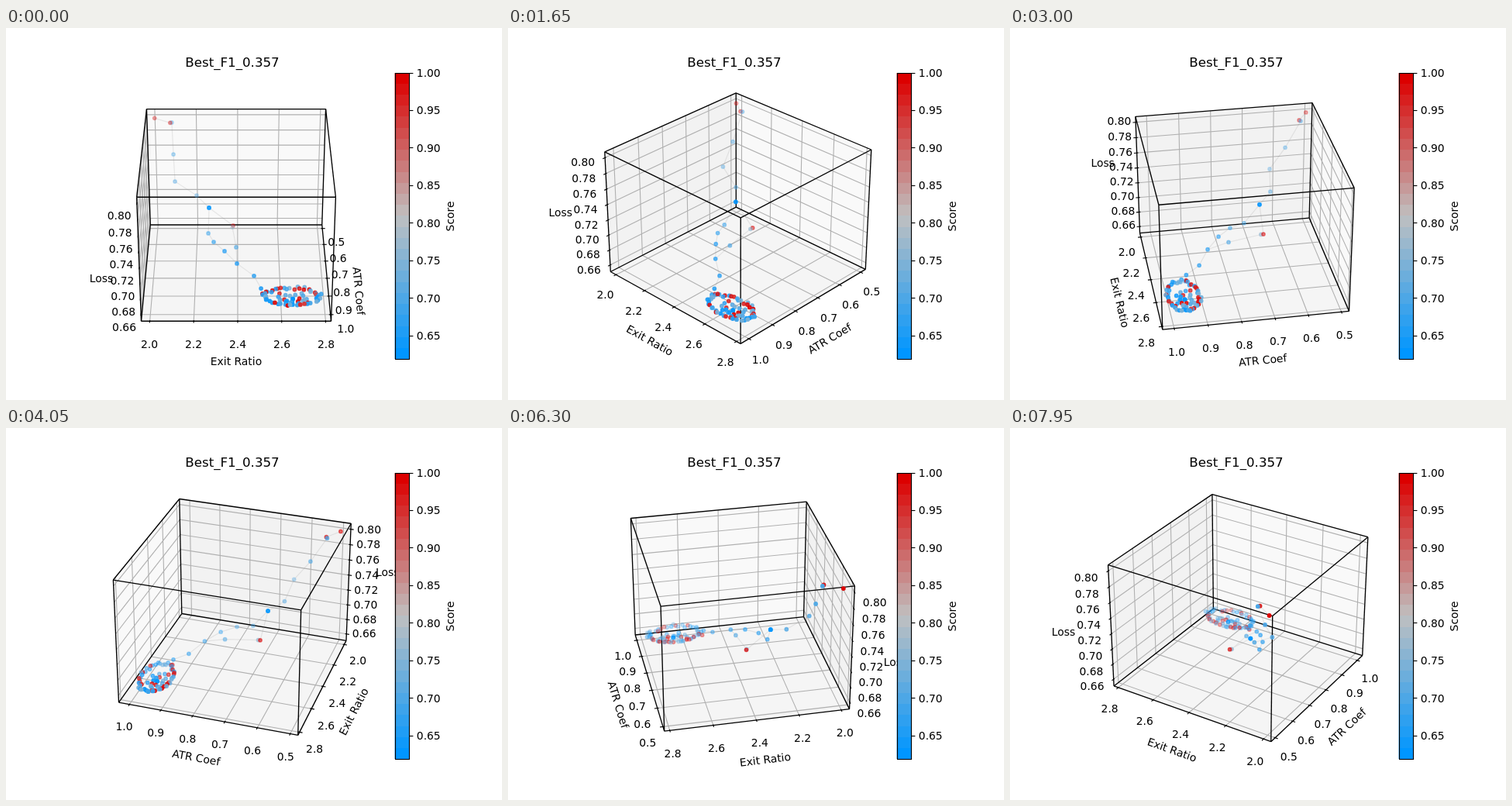
Write an HTML page with a canvas that moves like this. It is 640 px wide and 480 px high and loops after 8 s.

```html
<!DOCTYPE html>
<html>
<head>
<meta charset="utf-8">
<style>
html, body { margin: 0; width: 100%; height: 100%; overflow: hidden; background: #fff; }
canvas { display: block; }
</style>
</head>
<body>
<canvas id="stage" width="640" height="480"></canvas>
<script>
const ctx = document.getElementById('stage').getContext('2d');
const LOOP = 8000, STEP = 150, TURN = 4;
const HALF = [0.59524, 0.59524, 0.44643];   // half sizes of the box
const UNIT = [0.09524, 0.09524, 0.07143];   // a twelfth of each axis
const SCALE = 1997.8, CX = 297, CY = 237.4, DIST = 10;
const SIN = 0.5, COS = Math.sqrt(0.75);     // elevation of 30 degrees
const TICK_PAD = 1.037, LABEL_PAD = 2.255;

const axes = [
  { name: 'ATR Coef', from: 0.5, step: 0.1, n: 6, digits: 1, at: -0.5455, gap: 0.2135, other: 1, tickDir: 1 },
  { name: 'Exit Ratio', from: 2, step: 0.2, n: 5, digits: 1, at: -0.5415, gap: 0.2756, other: 0, tickDir: 0 },
  { name: 'Loss', from: 0.66, step: 0.02, n: 8, digits: 2, at: -0.3936, gap: 0.11403, tickDir: 0 }
];
const paneColors = ['#f9f9f9', '#f2f2f2', '#f5f5f5'];

// x, y, z, score
const trail = [
  [-0.541, -0.541, 0.406, 1], [-0.473, -0.435, 0.406, 0.97], [-0.481, -0.425, 0.404, 0.69],
  [-0.377, -0.414, 0.2215, 0.69], [-0.271, -0.403, 0.0756, 0.7], [-0.249, -0.261, -0.018, 0.7],
  [-0.161, -0.178, -0.061, 0.62], [-0.058, -0.1825, -0.195, 0.67], [0.042, -0.146, -0.201, 0.66],
  [0.131, -0.075, -0.2165, 0.65], [0.216, 0.005, -0.2575, 0.65], [0.289, 0.114, -0.305, 0.66],
  [0.381, 0.158, -0.341, 0.65], [0.385, 0.167, -0.378, 0.99]
];
const branch = [[-0.158, -0.02, -0.195, 0.99], [-0.143, -0.025, -0.199, 0.76], [0.077, 0, -0.22, 0.7]];
const links = [trail, [trail[6], ...branch, trail[10]]];

let seed = 11;
const rand = () => (seed = (seed * 16807) % 2147483647) / 2147483647;

// The late samples lie in a shallow elliptical bowl.
function bowl(count, inner, outer) {
  return Array.from({ length: count }, (_, i) => {
    const a = (i + rand() * 0.9) / count * 2 * Math.PI;
    const r = inner + (outer - inner) * rand();
    const score = rand() < 0.27 ? 0.93 + 0.07 * rand() : 0.63 + 0.11 * rand();
    return [0.425 + 0.112 * r * Math.cos(a), 0.355 + 0.185 * r * Math.sin(a),
      -0.4 + 0.035 * r * r + 0.008 * (rand() - 0.5), score];
  });
}
const best = [0.42, 0.36, -0.395, 0.62];
const points = [...trail, ...branch, trail[6], trail[6],
  ...bowl(50, 0.8, 1.02), ...bowl(20, 0.2, 0.75), best, best, best];

function scoreColor(score) {
  const k = (score - 0.6184) / 0.3816 * 2;
  const mix = (a, b, t) => a.map((v, i) => Math.round(v + (b[i] - v) * t));
  const mid = [192, 192, 192];
  const c = k < 1 ? mix([0, 150, 255], mid, Math.max(0, k)) : mix(mid, [220, 0, 0], k - 1);
  return `rgb(${c})`;
}

let ca = 1, sa = 0;
function project([x, y, z]) {
  const near = x * ca + y * sa;
  const depth = DIST - near * COS - z * SIN;
  const k = SCALE / depth;
  return [CX + k * (y * ca - x * sa), CY - k * (z * COS - near * SIN), depth];
}

function trace(pts, color, width) {
  ctx.beginPath();
  for (const p of pts) ctx.lineTo(...project(p).slice(0, 2));
  ctx.strokeStyle = color;
  ctx.lineWidth = width;
  ctx.stroke();
}

function text(str, x, y, size = 13.89, align = 'center', angle = 0, drop = 0) {
  ctx.save();
  ctx.translate(x, y);
  ctx.rotate(angle);
  ctx.font = size + 'px "DejaVu Sans", sans-serif';
  ctx.textAlign = align;
  ctx.fillStyle = '#000';
  ctx.fillText(str, 0, drop);
  ctx.restore();
}

const set = (p, i, v) => { const q = p.slice(); q[i] = v; return q; };
const outward = (p, axis, pad) =>
  p.map((v, i) => i === axis ? v : v + Math.sign(v) * pad * UNIT[i]);
const tickValues = a => Array.from({ length: a.n }, (_, i) => a.at + a.gap * i);

function drawBox(back) {
  paneColors.forEach((color, i) => {
    const j = (i + 1) % 3, k = (i + 2) % 3;
    ctx.beginPath();
    for (const [s, t] of [[-1, -1], [1, -1], [1, 1], [-1, 1]]) {
      const p = set(set(back, j, s * HALF[j]), k, t * HALF[k]);
      ctx.lineTo(...project(p).slice(0, 2));
    }
    ctx.fillStyle = color;
    ctx.fill();
  });
  axes.forEach((a, i) => {
    const j = (i + 1) % 3, k = (i + 2) % 3;
    for (const v of tickValues(a)) {
      const c = set(back, i, v);
      trace([set(c, j, -c[j]), c, set(c, k, -c[k])], '#b0b0b0', 1.11);
    }
  });
  for (let i = 0; i < 3; i++) {
    const j = (i + 1) % 3, k = (i + 2) % 3;
    for (const s of [-1, 1]) for (const t of [-1, 1]) {
      const p = set(set(HALF, j, s * HALF[j]), k, t * HALF[k]);
      trace([p, set(p, i, -p[i])], '#000', 1.35);
    }
  }
}

function drawAxis(a, i, back) {
  const turned = i === 2 ? 0 : a.other;
  const edge = set(back, turned, -back[turned]);
  const d = a.tickDir, side = Math.sign(edge[d]) * UNIT[d];
  tickValues(a).forEach((v, n) => {
    const p = set(edge, i, v);
    trace([set(p, d, p[d] - 0.1 * side), set(p, d, p[d] + 0.2 * side)], '#000', 1.11);
    const [x, y] = project(outward(p, i, TICK_PAD));
    text((a.from + n * a.step).toFixed(a.digits), x, y, 13.89, 'center', 0, 10.6);
  });
  const [x, y] = project(outward(set(edge, i, 0), i, LABEL_PAD));
  let angle = 0;
  if (i < 2) {
    const p = project(set(edge, i, -HALF[i])), q = project(set(edge, i, HALF[i]));
    angle = Math.atan((q[1] - p[1]) / (q[0] - p[0]));
  }
  text(a.name, x, y, 13.89, 'center', angle, 3.8);
}

function drawPoints() {
  for (const l of links) trace(l, 'rgba(128,128,128,0.16)', 1.2);
  const dots = points.map(p => [...project(p), scoreColor(p[3])]).sort((a, b) => b[2] - a[2]);
  const far = dots[0][2], near = dots[dots.length - 1][2];
  ctx.lineWidth = 1.39;
  for (const [x, y, depth, color] of dots) {
    ctx.globalAlpha = 1 - 0.7 * (depth - near) / (far - near);
    ctx.fillStyle = ctx.strokeStyle = color;
    ctx.beginPath();
    ctx.arc(x, y, 2.2, 0, 7);
    ctx.fill();
    ctx.stroke();
  }
  ctx.globalAlpha = 1;
}

function drawColorbar() {
  const left = 501.6, top = 57.6, w = 18.5, h = 369.6, bands = 26;
  for (let i = 0; i < bands; i++) {
    const y0 = Math.round(top + h * i / bands), y1 = Math.round(top + h * (i + 1) / bands);
    ctx.fillStyle = scoreColor(1 - 0.3816 * i / (bands - 1));
    ctx.fillRect(left, y0, w, y1 - y0);
  }
  ctx.strokeStyle = '#000';
  ctx.lineWidth = 1.11;
  ctx.strokeRect(502.5, 58.5, 18, 369);
  for (let i = 0; i < 8; i++) {
    const y = top + 48.43 * i;
    ctx.beginPath();
    ctx.moveTo(520.5, Math.round(y) + 0.5);
    ctx.lineTo(525.4, Math.round(y) + 0.5);
    ctx.stroke();
    text((1 - 0.05 * i).toFixed(2), 529.8, y + 5.4, 13.89, 'left');
  }
  text('Score', 573, 243, 13.89, 'center', -Math.PI / 2, 4.5);
}

function frame() {
  const az = Math.floor(performance.now() % LOOP / STEP) * TURN * Math.PI / 180;
  ca = Math.cos(az);
  sa = Math.sin(az);
  const back = [ca >= 0 ? -HALF[0] : HALF[0], sa >= 0 ? -HALF[1] : HALF[1], -HALF[2]];
  ctx.fillStyle = '#fff';
  ctx.fillRect(0, 0, 640, 480);
  drawBox(back);
  axes.forEach((a, i) => drawAxis(a, i, back));
  drawPoints();
  text('Best_F1_0.357', 292, 49.5, 16.67);
  drawColorbar();
  requestAnimationFrame(frame);
}
frame();
</script>
</body>
</html>
```
